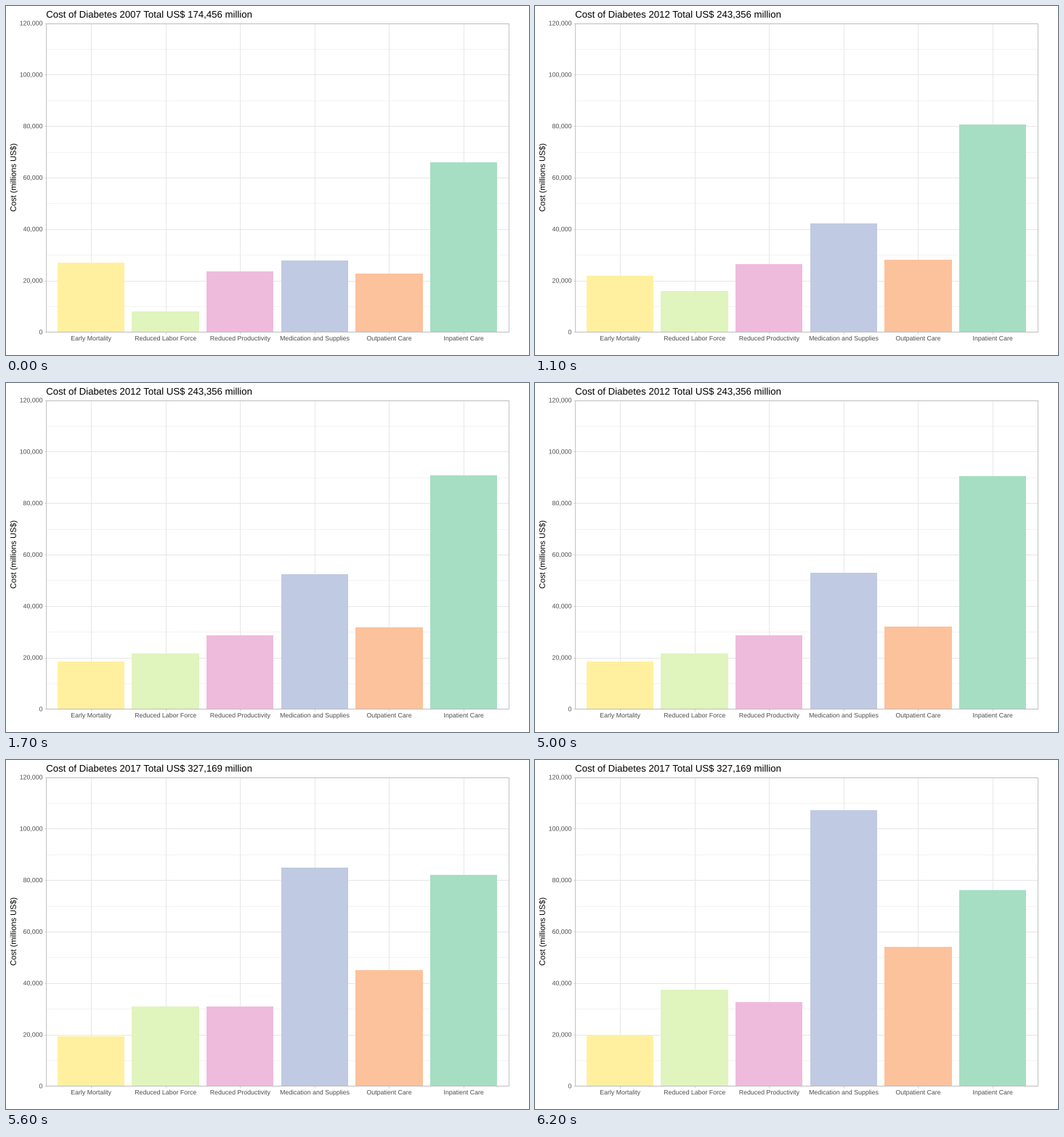
A matplotlib script that plays this animation: 720x480 px, repeating every 8000 ms.

```python
import numpy as np
import matplotlib.pyplot as plt
from matplotlib.animation import FuncAnimation
from matplotlib.patches import Rectangle
from matplotlib.patheffects import Normal

plt.rcParams["font.family"] = "Liberation Sans"
plt.rcParams["text.hinting"] = "none"

W, H = 720, 480
LEFT, RIGHT, TOP, BASE = 55.4, 691.6, 23.5, 448.3
Y_MAX = 120000
STEP = 100          # ms per frame
FRAMES = 80
EASE_STEPS = 15     # frames per transition
STARTS = (3, 48)    # frame at which each transition begins

LABELS = ("Early Mortality", "Reduced Labor Force", "Reduced Productivity",
          "Medication and Supplies", "Outpatient Care", "Inpatient Care")
COLORS = ("#fff0a0", "#e0f4bd", "#efbbdc", "#c0cae2", "#fcc29c", "#a6dec3")
COSTS = np.array([
    (26900, 7900, 23400, 27700, 22700, 65830),
    (18400, 21500, 28500, 52300, 31700, 90700),
    (19900, 37400, 32500, 107100, 54000, 76100),
])
TITLES = ("2007 Total US$ 174,456", "2012 Total US$ 243,356", "2017 Total US$ 327,169")

# 72 dpi makes one point equal to one pixel
fig = plt.figure(figsize=(W / 72, H / 72), dpi=72, facecolor="white")
ax = fig.add_axes([0, 0, 1, 1])
ax.set_xlim(0, W)
ax.set_ylim(H, 0)
ax.axis("off")


def y_px(cost):
    return BASE - cost / Y_MAX * (BASE - TOP)


def line(x0, y0, x1, y1, color, width):
    ax.plot([x0, x1], [y0, y1], color=color, lw=width, zorder=1,
            solid_capstyle="butt")


def label(x, y, text, size, color, ha, **kw):
    # a path effect draws glyphs as outlines, which keeps fractional spacing
    return ax.text(x, y, text, fontsize=size, color=color, ha=ha,
                   va="baseline", path_effects=[Normal()], **kw)


for cost in range(10000, Y_MAX, 20000):
    line(LEFT, y_px(cost), RIGHT, y_px(cost), "#f1f1f1", 0.8)

for cost in range(0, Y_MAX + 1, 20000):
    y = y_px(cost)
    line(LEFT, y, RIGHT, y, "#e2e2e2", 0.8)
    line(LEFT - 2.8, y, LEFT, y, "#b3b3b3", 0.6)
    label(50.4, y + 3.1, f"{cost:,}", 8.8, "#4d4d4d", "right")

unit = (RIGHT - LEFT) / 6.2
bars = []
for i, (name, color) in enumerate(zip(LABELS, COLORS)):
    x = LEFT + (i + 0.6) * unit
    line(x, TOP, x, BASE, "#e2e2e2", 0.8)
    line(x, BASE, x, BASE + 2.8, "#b3b3b3", 0.6)
    label(x, 460, name, 8.8, "#4d4d4d", "center")
    bar = Rectangle((x - 0.45 * unit, BASE), 0.9 * unit, 0, fc=color, lw=0,
                    zorder=2, snap=True)
    bars.append(ax.add_patch(bar))

ax.add_patch(Rectangle((LEFT, TOP), RIGHT - LEFT, BASE - TOP, fill=False,
                       ec="#b3b3b3", lw=0.8, zorder=3))
label(13.7, (TOP + BASE) / 2, "Cost (millions US$)", 11, "black", "center",
      rotation=90, rotation_mode="anchor")
title = label(55.2, 16, "", 13.2, "black", "left")


def ease(p):
    p = min(max(p, 0), 1)
    return 4 * p ** 3 if p < 0.5 else 1 - 4 * (1 - p) ** 3


def draw(frame):
    progress = [(frame - s) / EASE_STEPS for s in STARTS]
    costs = COSTS[0] + sum(ease(p) * (COSTS[k + 1] - COSTS[k])
                           for k, p in enumerate(progress))
    for bar, cost in zip(bars, costs):
        bar.set_height(y_px(cost) - BASE)
    state = sum(p > 0.5 for p in progress)
    title.set_text(f"Cost of Diabetes {TITLES[state]} million")
    return [*bars, title]


anim = FuncAnimation(fig, draw, frames=FRAMES, interval=STEP, repeat=True,
                     repeat_delay=0, blit=False)
plt.show()
```
